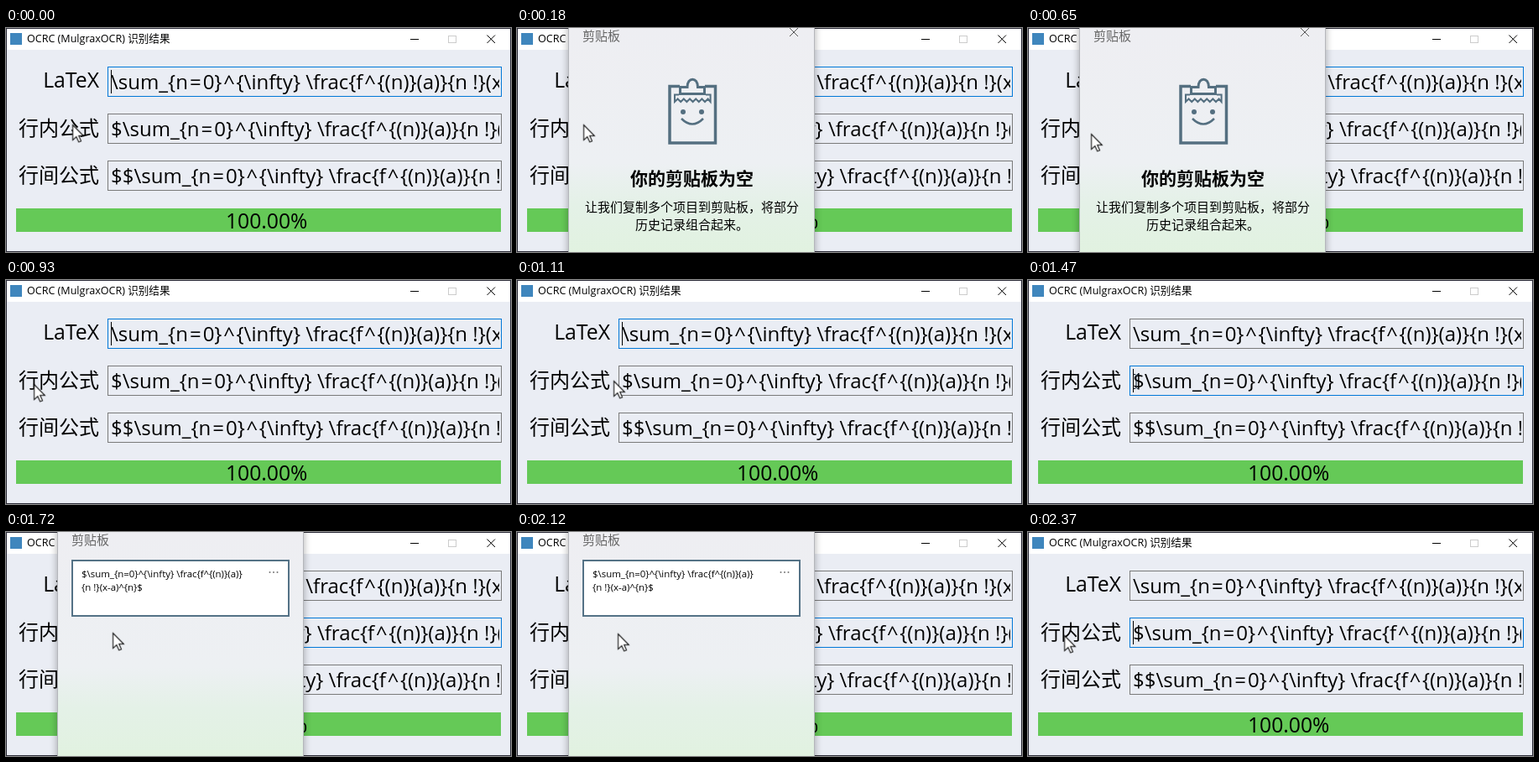
Write an HTML page that moves like this. It is 602x267 px and loops after 2.52 s.

```html
<!DOCTYPE html>
<html lang="zh-CN">
<head>
<meta charset="utf-8">
<title>识别结果</title>
<style>
  html, body { margin: 0; width: 100%; height: 100%; overflow: hidden; background: #eaedf4; }
  svg { display: block; width: 602px; height: 267px; }
  text { font-family: "Open Sans", "Noto Sans CJK SC", "Noto Sans CJK", sans-serif; fill: #000; white-space: pre; }
  .label { font-size: 24px; text-anchor: end; }
  .formula { font-size: 24px; }
  .op { letter-spacing: 2px; }
  .box { fill: #eaedf4; stroke: #7a7a7a; }
  .focus rect { fill: none; stroke: #0078d7; }
  .focus path { stroke: #000; }
  .line { fill: none; stroke: #546f80; }
  .small { font-size: 11.43px; }
  .mid { text-anchor: middle; }

  .anim { animation: 2520ms step-end infinite; }
  .focus.first { animation-name: first; }
  .focus.second { animation-name: second; }
  .panel { animation-name: panel; }
  .empty { animation-name: empty; }
  .filled { animation-name: filled; }
  .arrow { animation-name: arrow; }
  .beam { animation-name: beam; }

  @keyframes first { 0% { opacity: 1 } 55.15%, 100% { opacity: 0 } }
  @keyframes second { 0% { opacity: 0 } 55.15%, 100% { opacity: 1 } }
  @keyframes panel {
    0% { opacity: 0 } 2.77% { opacity: 1 } 35.31% { opacity: 0 }
    67.06% { opacity: 1 } 92.06%, 100% { opacity: 0 }
  }
  @keyframes empty { 0% { opacity: 0 } 7.14% { opacity: 1 } 35.31%, 100% { opacity: 0 } }
  @keyframes filled { 0% { opacity: 0 } 68.25% { opacity: 1 } 92.06%, 100% { opacity: 0 } }
  @keyframes arrow {
    0% { transform: translate(79px, 115px); opacity: 1 }
    25.79% { transform: translate(75px, 126px); opacity: 1; animation-timing-function: steps(5) }
    33.73% { transform: translate(31px, 124px); opacity: 1 }
    36.11% { transform: translate(33px, 124px); opacity: 1; animation-timing-function: steps(5) }
    44.04% { transform: translate(115px, 120px); opacity: 1 }
    45.63% { transform: translate(117px, 120px); opacity: 1 }
    47.22% { transform: translate(121px, 120px); opacity: 0 }
    67.06% { transform: translate(127px, 120px); opacity: 1 }
    84.12% { transform: translate(120px, 121px); opacity: 1; animation-timing-function: steps(5) }
    92.06% { transform: translate(31px, 124px); opacity: 1 }
    94.04%, 100% { transform: translate(43px, 123px); opacity: 1 }
  }
  @keyframes beam {
    0% { transform: translate(122px, 121px); opacity: 0 }
    47.22% { transform: translate(122px, 121px); opacity: 1; animation-timing-function: steps(7) }
    58.33% { transform: translate(129px, 121px); opacity: 1 }
    67.06%, 100% { transform: translate(129px, 121px); opacity: 0 }
  }
</style>
</head>
<body>
<svg viewBox="0 0 602 267">
  <defs>
    <linearGradient id="tint" x1="0" y1="0" x2="0" y2="1">
      <stop offset="0" stop-color="#eeeef2"/>
      <stop offset=".6" stop-color="#edf0f3"/>
      <stop offset=".78" stop-color="#e4f1e7"/>
      <stop offset="1" stop-color="#e1f2e0"/>
    </linearGradient>
    <filter id="shade" x="-10%" y="-10%" width="120%" height="120%">
      <feGaussianBlur stdDeviation="5"/>
    </filter>
    <clipPath id="inner"><path d="M123 40H588V200H123Z"/></clipPath>
    <text id="sum">\sum_{<tspan class="op">n=</tspan>0<tspan class="op">}^</tspan>{\infty} \frac{<tspan class="op">f^</tspan>{(n)}(a)}{n !}(x-a)^{n}</text>
  </defs>

  <!-- window -->
  <rect width="602" height="267" fill="#eaedf4"/>
  <rect width="602" height="26" fill="#fff"/>
  <rect x="5" y="6" width="14" height="14" fill="#3f86bd"/>
  <text x="25" y="17" font-size="12.55">OCRC (MulgraxOCR) 识别结果</text>
  <g fill="none" stroke="#000">
    <path d="M482 13.5h10M573.5 8.5l9.5 9.5M583 8.5l-9.5 9.5"/>
    <rect x="527.5" y="9.5" width="9" height="8" stroke="#ccc"/>
  </g>

  <text class="label" x="111" y="71" style="font-size:24.8px">LaTeX</text>
  <text class="label" x="111" y="128">行内公式</text>
  <text class="label" x="111" y="184">行间公式</text>
  <rect class="box" x="121.5" y="46.5" width="469" height="35"/>
  <rect class="box" x="121.5" y="102.5" width="469" height="35"/>
  <rect class="box" x="121.5" y="158.5" width="469" height="35"/>
  <g class="formula" clip-path="url(#inner)">
    <use href="#sum" x="125" y="73"/>
    <text x="125" y="129">$</text>
    <use href="#sum" x="138.7" y="129"/>
    <text x="125" y="185">$$</text>
    <use href="#sum" x="152.4" y="185"/>
  </g>
  <g class="anim focus first">
    <rect x="121.5" y="46.5" width="469" height="35"/>
    <path d="M125.5 50v28"/>
  </g>
  <g class="anim focus second">
    <rect x="121.5" y="102.5" width="469" height="35"/>
    <path d="M125.5 106v28"/>
  </g>

  <rect x="12" y="215" width="578" height="28" fill="#65c957"/>
  <text class="mid" x="310.7" y="239" font-size="24.7">100.00%</text>
  <rect x=".5" y=".5" width="601" height="266" fill="none" stroke="#2e2e3a"/>

  <!-- clipboard panel -->
  <g class="anim panel">
    <rect x="61" y="-12" width="294" height="300" fill="#000" opacity=".32" filter="url(#shade)"/>
    <rect x="61.5" y="-2" width="293" height="272" fill="url(#tint)" stroke="#b4b6bb"/>
    <text x="78" y="15" font-size="15" style="fill:#666">剪贴板</text>
  </g>

  <g class="anim empty">
    <path d="M325 0l10 10M335 0l-10 10" stroke="#555" fill="none"/>
    <g class="line" stroke-width="3.5">
      <path d="M194 69.5H182V137H236.5V69.5H224"/>
      <path d="M194.5 78.5V70.5H203C203 58 215.5 58 215.5 70.5H223.5V78.5Z" stroke-width="3"/>
      <path d="M193 79.5H188V88l3.6 -3.5 3.6 3.5 3.6 -3.5 3.6 3.5 3.6 -3.5 3.6 3.5 3.6 -3.5 3.6 3.5 3.6 -3.5 3.6 3.5 3.6 -3.5 3 3.5V79.5H225" stroke-width="2"/>
      <path d="M196 108Q209 121 222 108" stroke-width="2.5"/>
    </g>
    <g fill="#546f80">
      <circle cx="198" cy="100" r="3"/>
      <circle cx="220" cy="100" r="3"/>
    </g>
    <text class="mid" x="208.5" y="187" font-size="21" font-weight="700">你的剪贴板为空</text>
    <text class="mid" x="208.5" y="219" font-size="15">让我们复制多个项目到剪贴板，将部分</text>
    <text x="141" y="240" font-size="15">历史记录组合起来。</text>
  </g>

  <g class="anim filled">
    <rect x="79" y="34" width="258" height="66" fill="#fff" stroke="#547286" stroke-width="2"/>
    <text class="small" x="90" y="54">$\sum_{n=0}^{\infty} \frac{f^{(n)}(a)}</text>
    <text class="small" x="90" y="70">{n !}(x-a)^{n}$</text>
    <g fill="#777">
      <circle cx="314.5" cy="48" r="1"/>
      <circle cx="319" cy="48" r="1"/>
      <circle cx="323.5" cy="48" r="1"/>
    </g>
  </g>

  <!-- pointers -->
  <path class="anim beam" d="M-3 -8.5H-1L0 -7.5 1 -8.5H3M0 -7.5V7.5M-3 8.5H-1L0 7.5 1 8.5H3" fill="none" stroke="#123"/>
  <g class="anim arrow">
    <path transform="scale(1.13)" d="M.5 .5V16.5L4.2 13 6.8 18.5 9.3 17.4 6.8 12H11.8Z" fill="#fff" stroke="#000" stroke-width=".9"/>
  </g>
</svg>
</body>
</html>
```
